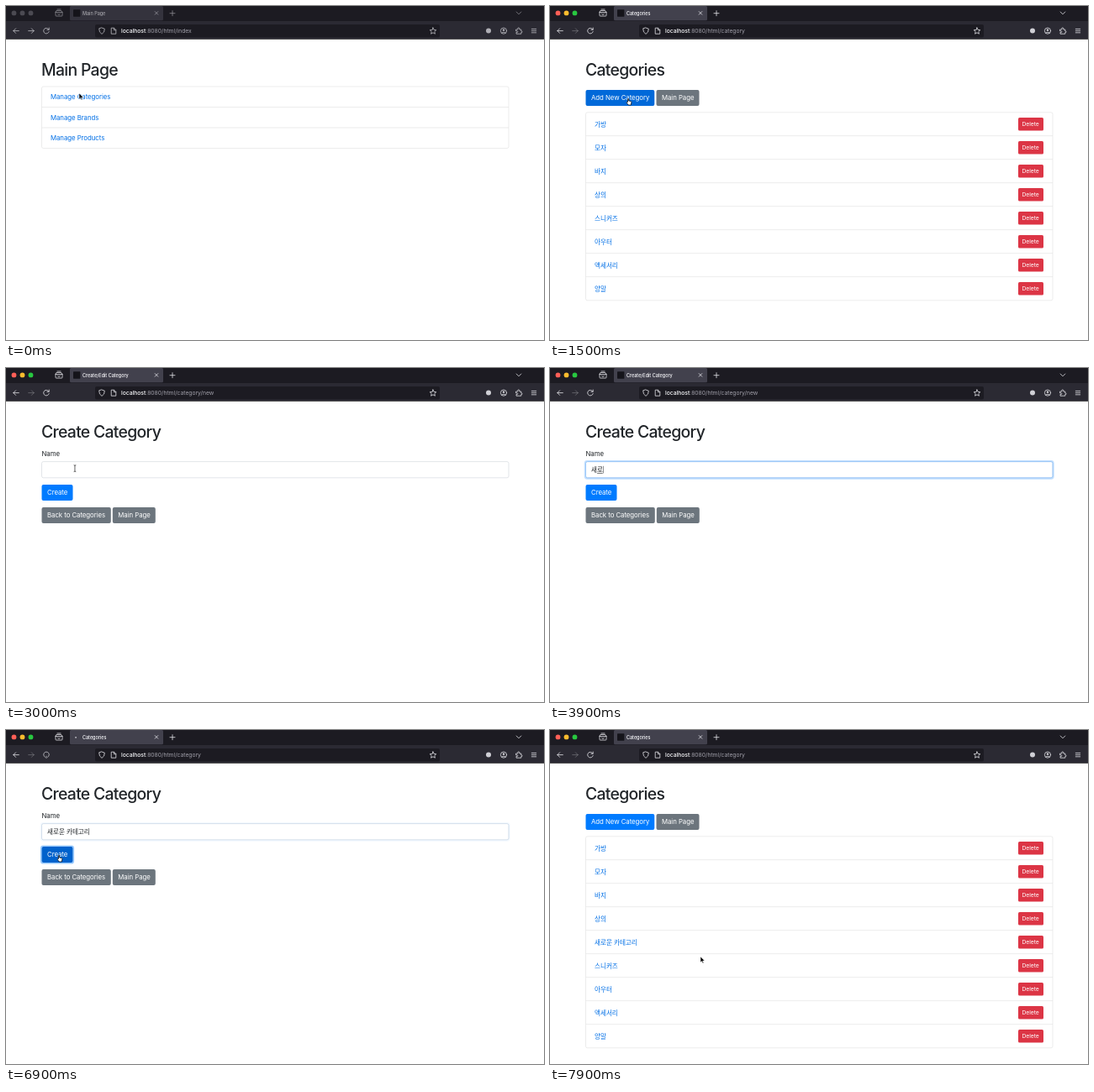
An HTML page that plays this animation: 640 by 398 pixels, repeating every 8000 ms.

```html
<!DOCTYPE html>
<html lang="ko">
<head>
<meta charset="utf-8">
<style>
  html, body { margin: 0; height: 100%; overflow: hidden; background: #fff; }
  svg { display: block; width: 100vw; height: 100vh; }
  text { font: 7.8px Inter, "Noto Sans CJK KR", "Noto Sans CJK", sans-serif; letter-spacing: -.005em; fill: #212529; white-space: pre; }
  .h1 { font-size: 19.4px; font-weight: 500; letter-spacing: -.036em; }
  .ko { font-size: 7.6px; }
  .link { fill: #006fe6; }
  .hover { fill: #0056b3; text-decoration: underline; }
  .btn { fill: #fff; }
  .small { font-size: 6.8px; }
  .tab { font-size: 5.5px; font-weight: 500; fill: #fbfbfe; }
  .url { font-size: 6.8px; fill: #9f9ea8; }
  .host { fill: #fbfbfe; font-weight: 500; }
  .icon { fill: none; stroke: #e4e4e9; stroke-width: .8; stroke-linecap: round; stroke-linejoin: round; }
</style>
</head>
<body>
<svg id="stage" viewBox="0 0 640 398" preserveAspectRatio="none"></svg>
<script>
const LOOP = 8000;
const ACTIVATE = 400, BLUR = 6780;
// Each visit: address change, page display, path, tab title
const visits = [
  [-1000, -1000, 'index', 'Main Page'],
  [800, 900, 'category', 'Categories'],
  [2300, 2430, 'category/new', 'Create/Edit Category'],
  [6800, 7100, 'category', 'Categories']
];
const categories = ['가방', '모자', '바지', '상의', '스니커즈', '아우터', '액세서리', '양말'];
const newCategory = '새로운 카테고리';
const typing = [
  [3500, 'ㅅ'], [3600, '새'], [3700, '샐'], [3900, '새로'], [4100, '새롱'], [4200, '새로우'],
  [4500, '새로운'], [4600, '새로운 '], [4700, '새로운 ㅋ'], [4800, '새로운 카'], [4900, '새로운 카테'],
  [5000, '새로운 카텍'], [5100, '새로운 카테고'], [5200, newCategory]
];
const mousePath = [
  [0, 87, 104], [1000, 87, 104], [1300, 93, 110], [2150, 93, 110], [2450, 90, 110], [2750, 90, 110],
  [3100, 80, 117], [5600, 80, 117], [5900, 63, 149], [7250, 63, 149], [7800, 179, 270], [LOOP, 179, 270]
];
const mouseShapes = [
  [0, 'arrow'], [ACTIVATE, 'hand'], [900, 'arrow'], [1250, 'hand'], [2430, 'arrow'], [2950, 'beam'],
  [3500, 'none'], [5600, 'beam'], [5720, 'arrow'], [5820, 'hand'], [7100, 'arrow']
];
const pointers = {
  arrow: '<path d="M0 0V7L1.6 5.5L2.7 8L3.8 7.5L2.7 5.1H5Z" fill="#000" stroke="#fff" stroke-width=".5"/>',
  hand: '<path d="M-.5 4.5V.8C-.5 0 .6 0 .6 .8V3L3.3 3.6C3.9 3.8 4 4.4 3.8 5L3.3 8H.3L-1.7 5.4C-2.1 4.6-1.2 4-.5 4.5Z" fill="#fff" stroke="#000" stroke-width=".7"/>',
  beam: '<path d="M-1.3 0Q0 0 0 1Q0 0 1.3 0M0 1V7M-1.3 8Q0 8 0 7Q0 8 1.3 8" fill="none" stroke="#222" stroke-width=".7"/>',
  none: ''
};

const clamp = v => Math.max(0, Math.min(1, v));
const latest = (list, t) => list.filter(item => item[0] <= t).pop();
const text = (x, y, s, cls = '') => `<text x="${x}" y="${y}" class="${cls}">${s}</text>`;
const rect = (x, y, w, h, fill, r = 0, extra = '') =>
  `<rect x="${x}" y="${y}" width="${w}" height="${h}" rx="${r}" fill="${fill}" ${extra}/>`;
const icon = (d, opacity = 1) => `<path class="icon" d="${d}" opacity="${opacity}"/>`;
const circle = (x, y, r, fill, extra = '') => `<circle cx="${x}" cy="${y}" r="${r}" fill="${fill}" ${extra}/>`;
const button = (x, y, w, label, fill) => rect(x, y, w, 19, fill, 2) + text(x + 6.5, y + 12.3, label, 'btn');
const outline = (x, y, w, h, color) => rect(x, y, w, h, '#fff', 2, `stroke="${color}" stroke-width=".6"`);

function list(y, rowHeight, rows, drawRow) {
  let out = outline(42.5, y, 555.5, rowHeight * rows.length, '#dfdfdf');
  rows.forEach((row, i) => {
    const top = y + i * rowHeight;
    if (i) out += rect(42.5, top - .3, 555.5, .6, '#dfdfdf');
    out += drawRow(row, top + rowHeight / 2, i);
  });
  return out;
}

function mainPage(t) {
  return text(42, 83.3, 'Main Page', 'h1') +
    list(96, 24.5, ['Manage Categories', 'Manage Brands', 'Manage Products'], (label, mid, i) =>
      text(53, mid + 2.8, label, i === 0 && t >= ACTIVATE ? 'hover' : 'link'));
}

function categoriesPage(t) {
  const names = t > 5000 ? [...categories.slice(0, 4), newCategory, ...categories.slice(4)] : categories;
  const hovered = t > 1250 && t < 5000;
  return text(42, 83.3, 'Categories', 'h1') +
    button(42.5, 100, 81.8, 'Add New Category', hovered ? '#0069d9' : '#007bff') +
    button(126.5, 100, 51, 'Main Page', '#6c757d') +
    list(126.8, 28, names, (name, mid) =>
      text(53, mid + 2.9, name, 'link ko') +
      rect(557, mid - 7.8, 30, 15.6, '#dc3545', 1.6) + text(561.4, mid + 2.6, 'Delete', 'btn small'));
}

function inputText(t) {
  const entry = latest(typing, t);
  const value = entry ? entry[1] : '';
  const width = s => [...s].reduce((sum, c) => sum + (c === ' ' ? 2.1 : 6.95), 0);
  const end = 49 + width(value);
  let out = text(49, 123.8, value, 'ko');
  if (t < 3100 || t >= BLUR) return out;
  if (value && !value.endsWith(' ') && t < 5800) out += rect(end - 6.8, 125.2, 6.6, .6, '#212529');
  return out + rect(end + .1, 116.8, .5, 8.6, '#212529');
}

function createPage(t) {
  const focus = clamp((t - 3080) / 150) * (1 - clamp((t - BLUR) / 150));
  const pressed = clamp((t - BLUR) / 100);
  const createFill = pressed ? '#0062cc' : t > 5820 ? '#0069d9' : '#007bff';
  return text(42, 83.3, 'Create Category', 'h1') + text(42.5, 104.8, 'Name') +
    rect(41.6, 110.8, 557.2, 21, 'none', 2.6, `stroke="#007bff" stroke-width="1.7" opacity="${focus * .25}"`) +
    outline(42.5, 111.6, 555.5, 19.2, '#ced4da') +
    rect(42.5, 111.6, 555.5, 19.2, 'none', 2, `stroke="#80bdff" stroke-width=".7" opacity="${focus}"`) +
    inputText(t) +
    rect(41.7, 138.2, 38.6, 20.6, 'none', 2.6, `stroke="#007bff" stroke-width="1.6" opacity="${pressed * .4}"`) +
    button(42.5, 139, 37, 'Create', createFill) +
    button(42.5, 166, 82.3, 'Back to Categories', '#6c757d') +
    button(126.8, 166, 51, 'Main Page', '#6c757d');
}

function tabStrip(t, shown, loading) {
  const active = t >= ACTIVATE;
  const lights = active ? ['#ff5f57', '#febc2e', '#28c840'] : ['#4b4a52', '#4b4a52', '#4b4a52'];
  const burst = shown[1] > 0 ? clamp((t - shown[1]) / 400) : 1;
  let out = rect(0, 0, 640, 18.5, '#1c1b22') + rect(76, 0, 111, 17.2, active ? '#42414d' : '#34333d', 1.5);
  lights.forEach((color, i) => out += circle(9.5 + 10 * i, 8.4, 2.9, color));
  if (burst < 1) out += circle(84, 8.5, 6 + 70 * burst, '#0a84ff', `opacity="${.5 * (1 - burst)}" clip-path="url(#tabClip)"`);
  out += loading
    ? circle(84 - 3 * Math.cos((t - loading[0]) / 81), 8.8, .9, '#d0d0d6')
    : rect(80, 4.3, 8.4, 8.4, '#15141a', .6);
  return out + `<g opacity="${active ? 1 : .55}">` +
    icon('M60.3 5.5H65.7L67 7.5V11.3Q67 12 66.3 12H59.7Q59 12 59 11.3V7.5ZM59 7.5H67M61.5 9.2L63 10.4L64.5 9.2M61 4H65') +
    text(91, 10.9, (loading || shown)[3], 'tab') +
    icon('M177.2 6.6L180.8 10.2M180.8 6.6L177.2 10.2M195 8.7H201M198 5.7V11.7M607.2 7L610 9.8L612.8 7') + '</g>';
}

function toolbar(t, address, loading) {
  const reload = loading
    ? icon('M46.4 32.3A3.3 3.3 0 1 1 49.6 32.3M48 31.2V33.5', .85)
    : icon('M50.9 28A3.3 3.3 0 1 0 51.2 30.5M51.2 26V28.3H48.9');
  return rect(0, 18, 640, 21.3, '#2b2a33') + rect(0, 39.2, 640, .6, '#0c0c0d') +
    rect(106, 22, 410, 15.6, '#1c1b22', 2) +
    `<g opacity="${t < ACTIVATE ? .8 : 1}">` +
    icon('M15.3 29.6H8.8M11.6 26.8L8.8 29.6L11.6 32.4') +
    icon('M26.7 29.6H33.2M30.4 26.8L33.2 29.6L30.4 32.4', t < 800 ? 1 : .35) + reload +
    icon('M114 26L117.3 27.2Q117.5 31.6 114 33.4Q110.5 31.6 110.7 27.2Z') +
    icon('M125.6 26.2H128.6L130.8 28.4V33.2H125.6ZM128.4 26.4V28.7H130.6') +
    icon('M508 25.9L509.1 28.4L511.8 28.7L509.8 30.5L510.4 33.2L508 31.8L505.6 33.2L506.2 30.5L504.2 28.7L506.9 28.4Z') +
    circle(574, 29.6, 3, '#d0d0d6') +
    circle(592, 29.6, 3.6, 'none', 'class="icon"') + circle(592, 28.6, 1.2, '#e4e4e9') +
    icon('M589.8 31.9Q592 30 594.2 31.9') +
    icon('M607 28H608.8Q608.3 25.9 609.8 25.9Q611.3 25.9 610.8 28H612.8V30Q614 29.7 614 30.8Q614 31.9 612.8 31.6V33.2H607V31.4Q608.8 31.8 608.8 30.6Q608.8 29.5 607 29.8Z') +
    icon('M625.3 27.4H630.7M625.3 29.6H630.7M625.3 31.8H630.7') + '</g>' +
    text(137, 32, `<tspan class="host">localhost</tspan>:8080/html/${address}`, 'url');
}

function mouse(t) {
  const i = mousePath.findIndex(point => point[0] > t);
  const [t0, x0, y0] = mousePath[i - 1], [t1, x1, y1] = mousePath[i];
  const p = (t - t0) / (t1 - t0), ease = p * p * (3 - 2 * p);
  const x = x0 + (x1 - x0) * ease, y = y0 + (y1 - y0) * ease;
  return `<g transform="translate(${x} ${y})">${pointers[latest(mouseShapes, t)[1]]}</g>`;
}

const pages = { 'index': mainPage, 'category': categoriesPage, 'category/new': createPage };
const stage = document.getElementById('stage');
let drawn = '';

function render(t) {
  const requested = latest(visits, t);
  const shown = visits.filter(visit => visit[1] <= t).pop();
  const loading = requested === shown ? null : requested;
  const markup = '<clipPath id="tabClip"><rect x="76" width="111" height="17.2" rx="1.5"/></clipPath>' +
    rect(0, 0, 640, 398, '#fff') + pages[shown[2]](t) +
    tabStrip(t, shown, loading) + toolbar(t, requested[2], loading) + mouse(t);
  if (markup !== drawn) stage.innerHTML = drawn = markup;
}

const start = performance.now();
function tick() {
  render((performance.now() - start) % LOOP);
  requestAnimationFrame(tick);
}
tick();
</script>
</body>
</html>
```
